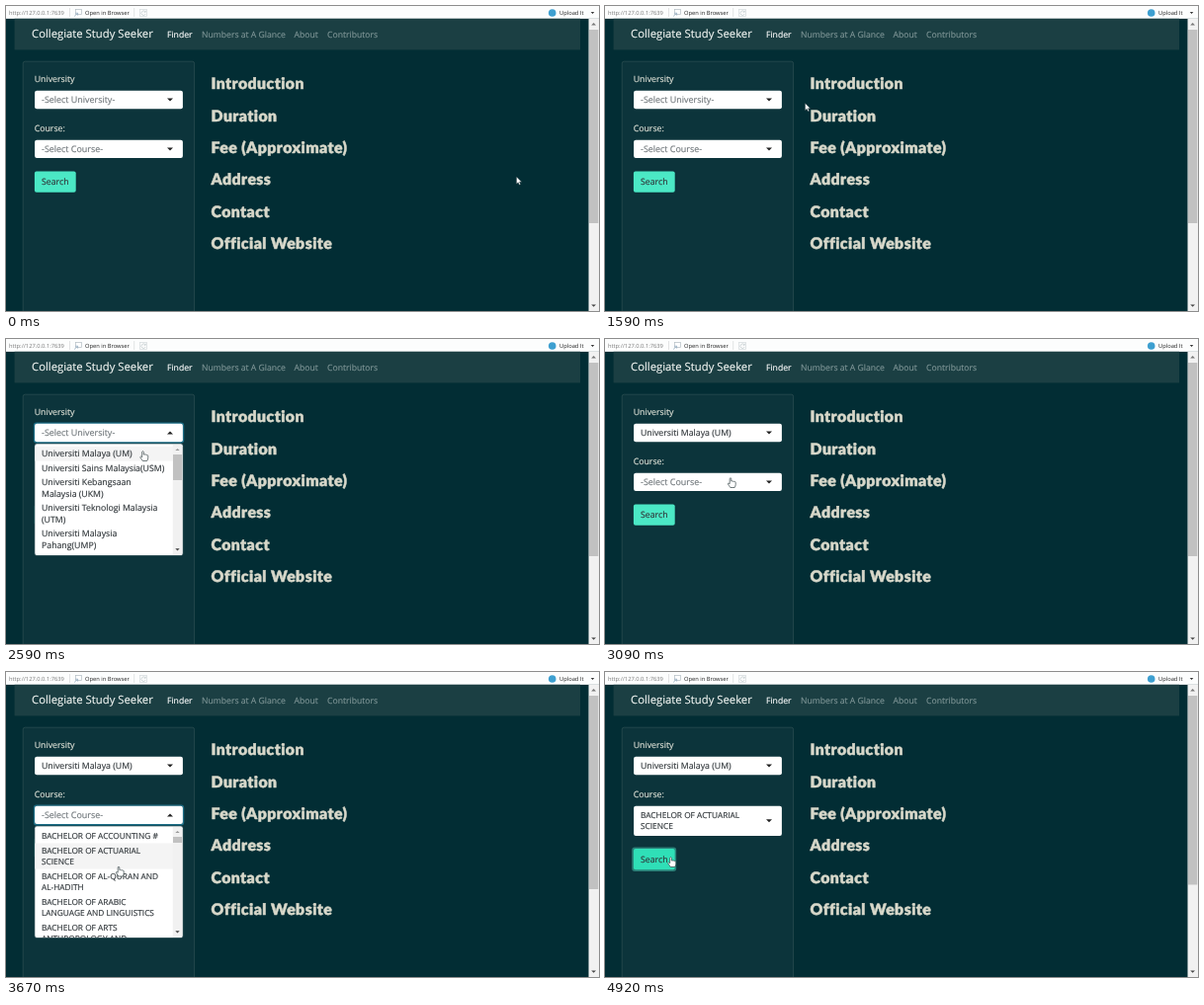
Write an HTML page that moves like this. It is 600 by 309 pixels and loops after 5 s.

```html
<!DOCTYPE html>
<html lang="en">
<head>
<meta charset="utf-8">
<title>Course search</title>
<style>
  html, body { margin: 0; width: 100%; height: 100%; overflow: hidden; background: #022d34; }
  svg { display: block; width: 600px; height: 309px; }
  text {
    font-family: "Open Sans", "Noto Sans", sans-serif; font-size: 8.75px; white-space: pre;
    text-rendering: geometricPrecision; fill: currentColor; stroke: currentColor; stroke-width: .15;
  }
  .head { font: 900 15.8px Lato, sans-serif; letter-spacing: .45px; color: #d8d8ca; stroke-width: .5; stroke-linejoin: round; }
  .brand { font-size: 11.3px; color: #f1f5f2; }
  .nav { font-size: 8.62px; color: #7d9495; }
  .on { color: #fff; }
  .label { color: #e3e5da; }
  .hint { font-size: 8.95px; color: #70777b; }
  .item { color: #30363a; }
  .caps { font-size: 8.3px; }
  .tool { font-size: 5.75px; color: #222; stroke: none; }
  .url { color: #777; }
</style>
</head>
<body>
<svg viewBox="0 0 600 309">
  <g id="page"></g>
  <g id="form"></g>
  <g id="cursor"></g>
</svg>
<script>
const LOOP = 5000;
const OPEN_UNI = 2090, PICK_UNI = 2750, OPEN_COURSE = 3340, PICK_COURSE = 4170, PRESS = 4750;

// Cursor path: time, x, y of the tip
const PATH = [
  [0, 516.5, 173], [250, 516.5, 173], [1590, 202.5, 98.5], [1920, 150, 96], [2090, 150, 96],
  [2590, 138.5, 113.5], [2750, 138.5, 113.5], [3090, 127, 140.5], [3340, 124, 144],
  [3670, 114, 197], [4090, 113, 193], [4250, 113, 193], [4750, 66.5, 187.5], [5000, 66.5, 187.5]
];

const UNIS = [
  ["Universiti Malaya (UM)"],
  ["Universiti Sains Malaysia(USM)"],
  ["Universiti Kebangsaan", "Malaysia (UKM)"],
  ["Universiti Teknologi Malaysia", "(UTM)"],
  ["Universiti Malaysia", "Pahang(UMP)"]
];
const COURSES = [
  ["BACHELOR OF ACCOUNTING #"],
  ["BACHELOR OF ACTUARIAL", "SCIENCE"],
  ["BACHELOR OF AL-QURAN AND", "AL-HADITH"],
  ["BACHELOR OF ARABIC", "LANGUAGE AND LINGUISTICS"],
  ["BACHELOR OF ARTS", "ANTHROPOLOGY AND"]
];

const layer = id => document.getElementById(id);
const text = (x, y, str, cls) => `<text x="${x}" y="${y}" class="${cls}">${str}</text>`;
const rect = (x, y, w, h, fill, more = "") =>
  `<rect x="${x}" y="${y}" width="${w}" height="${h}" fill="${fill}" ${more}/>`;
const path = (d, fill, more = "") => `<path d="${d}" fill="${fill}" ${more}/>`;

// Triangle centred on x, y; dir 1 points down, -1 up
const caret = (x, y, w, dir, fill = "#333") =>
  path(`M${x - w} ${y - dir * w / 2}h${2 * w}l${-w} ${dir * w}z`, fill);

function drawPage() {
  const heads = ["Introduction", "Duration", "Fee (Approximate)", "Address", "Contact", "Official Website"];
  const line = 'stroke-width=".7" stroke=';
  return rect(0, 0, 600, 309, "#022d34")
    // toolbar
    + rect(0, 0, 600, 12.8, "#fcfdfd") + rect(0, 12.2, 600, .6, "#e6e9ea")
    + text(3, 9.2, "http://127.0.0.1:7639", "tool url")
    + [64, 129.5].map(x => rect(x, 2, .6, 9, "#d0d3d4")).join("")
    + rect(70.5, 3.6, 6, 5, "#fff", line + '"#b3bdc3"')
    + path("M69 10.6l3.6-3.4m-2.4 0h2.4v2.4", "none", line + '"#8fa9bd"')
    + text(80, 9.2, "Open in Browser", "tool")
    + rect(135.5, 3.5, 7, 7, "#fafbfb", line + '"#d5dbdd"')
    + path("M141 6a2.2 2.2 0 1 0 .2 2M141.3 4.6v1.6h-1.6", "none", line + '"#c0cacd"')
    + '<circle cx="552.7" cy="7" r="3.8" fill="#3d9fd0"/>'
    + text(560, 9.2, "Upload It", "tool") + caret(593.5, 7, 1.8, 1)
    // navigation
    + rect(8.6, 12.8, 572.4, 31.6, "#1b3f43")
    + text(26, 32.3, "Collegiate Study Seeker", "brand")
    + text(163, 31.8, "Finder", "nav on")
    + text(198, 31.8, "Numbers at A Glance", "nav")
    + text(291.5, 31.8, "About", "nav") + text(325, 31.8, "Contributors", "nav")
    // panel and headings
    + rect(17.2, 56.2, 173.4, 270, "#0c343b", 'rx="2" stroke="#274a4e" stroke-width=".9"')
    + heads.map((h, i) => text(207.5, 84.1 + i * 32.4, h, "head")).join("")
    // scrollbar
    + rect(589.5, 13, 10.5, 296, "#f1f1f1")
    + caret(594.6, 18.3, 2.4, -1, "#777") + caret(594.6, 303.6, 2.4, 1, "#444");
}

function drawSelect(y, lines, cls, open) {
  const h = lines.length > 1 ? 30.2 : 18.4;
  const glow = open ? rect(28.5, y - .6, 151, h + 1.2, "none", 'rx="2.5" stroke="#1c6d85" stroke-width="1.4"') : "";
  return glow + rect(29.1, y, 149.8, h, "#fff", 'rx="2"')
    + lines.map((s, i) => text(36, y + 12.3 + i * 11.4, s, cls)).join("")
    + caret(166, y + h / 2, 3, open ? -1 : 1, "#222");
}

const rowHeight = row => row.length > 1 ? 26 : 14.5;

function drawMenu(y, rows, cls, hoverY, thumb) {
  let top = y + 3, hover = "", words = "";
  const inside = hoverY >= top;
  rows.forEach((row, i) => {
    const h = rowHeight(row);
    if (inside ? hoverY >= top && hoverY < top + h : i === 0)
      hover = rect(29.2, top, 140, h, "#f4f4f4");
    row.forEach((s, n) => words += text(36, top + 10.3 + n * 11.4, s, cls));
    top += h;
  });
  const box = fill => rect(29.2, y + .3, 149.6, 112.8, fill, 'rx="2"');
  return `<clipPath id="menu">${box("#fff")}</clipPath>`
    + rect(28.8, y, 150.4, 113.5, "#5d767a", 'rx="2"')
    + `<g clip-path="url(#menu)">` + box("#fff") + hover + words
    + rect(168.8, y + 1, 9.4, 112, "#f1f1f1") + rect(169, y + 11, 9, thumb, "#c1c1c1")
    + caret(173.5, y + 6, 2.2, -1, "#999") + caret(173.5, y + 107.4, 2.2, 1, "#444") + "</g>";
}

function drawForm(t, hoverY) {
  const uniOpen = t >= OPEN_UNI && t < PICK_UNI;
  const courseOpen = t >= OPEN_COURSE && t < PICK_COURSE;
  const picked = t >= PICK_COURSE, pressed = t >= PRESS;
  const by = picked ? 179 : 167.5;
  // a longer page makes the scroll thumb shorter
  let out = rect(590, 24, 9.3, picked ? 191.5 : 196, "#c1c1c1")
    + text(28.7, 77.2, "University", "label") + text(28.7, 127.2, "Course:", "label")
    + (t < PICK_UNI ? drawSelect(85.8, ["-Select University-"], "hint", uniOpen)
                    : drawSelect(85.8, UNIS[0], "item", false))
    + (picked ? drawSelect(135.7, COURSES[1], "item caps", false)
              : drawSelect(135.7, ["-Select Course-"], "hint", courseOpen));
  if (pressed) out += rect(27.2, by - 1.5, 45, 24.4, "#2a7f77", 'rx="3"');
  out += rect(28.9, by + .1, 41.8, 21.2, pressed ? "#2fdfb7" : "#4be8c5", 'rx="2"')
    + text(36, by + 13.9, "Search", "item");
  if (uniOpen) out += drawMenu(106, UNIS, "item", hoverY, 26);
  if (courseOpen) out += drawMenu(156, COURSES, "item caps", hoverY, 6);
  return out;
}

// Monotone cubic through the path points, one axis at a time
function along(t, axis) {
  const slope = i => PATH[i + 1] && PATH[i]
    ? (PATH[i + 1][axis] - PATH[i][axis]) / (PATH[i + 1][0] - PATH[i][0]) : 0;
  const tangent = i => {
    const a = slope(i - 1), b = slope(i);
    return a * b > 0 ? 2 * a * b / (a + b) : 0;
  };
  let i = 0;
  while (i < PATH.length - 2 && t >= PATH[i + 1][0]) i++;
  const d = PATH[i + 1][0] - PATH[i][0], u = (t - PATH[i][0]) / d, v = 1 - u;
  return (1 + 2 * u) * v * v * PATH[i][axis] + u * v * v * d * tangent(i)
    + u * u * (3 - 2 * u) * PATH[i + 1][axis] - u * u * v * d * tangent(i + 1);
}

function overControl(t, x, y) {
  const within = (a, b) => y >= a && y <= b;
  if (x < 28.7 || x > 179) return false;
  if (within(85.5, 104.5)) return true;
  if (t >= OPEN_UNI && t < PICK_UNI) return within(106, 219);
  if (t >= OPEN_COURSE && t < PICK_COURSE) return within(135, 270);
  if (t >= PICK_COURSE) return within(135, 166) || x < 71 && within(179, 200);
  return within(135, 154.5) || x < 71 && within(167.5, 189);
}

function drawCursor(t, x, y) {
  const arrow = "M0 0V7.2L1.7 5.7 2.9 8.2 4.1 7.7 3 5.2H5.2Z";
  const hand = "M-.8 .8Q0 -.6 .8 .8V3.6Q1.7 2.9 2.4 3.8 3.3 3.2 3.9 4.1 5 3.7 5.2 4.9V7Q5 8.6 4.2 10H-.2Q-1.5 8-2.8 6.2-2.4 4.8-.8 6.2Z";
  const over = overControl(t, x, y);
  return `<g transform="translate(${x} ${y})">`
    + path(over ? hand : arrow, "#fff", `stroke="#27363a" stroke-width="${over ? .65 : .4}" stroke-linejoin="round"`)
    + "</g>";
}

// The picture advances twelve times a second, on 10 ms marks
const stepStart = k => Math.ceil(k * 25 / 3) * 10;

const begin = performance.now();
let shown = -1;

function frame() {
  const t = (performance.now() - begin) % LOOP;
  let k = Math.floor(t * 12 / 1000);
  if (stepStart(k) > t) k--;
  if (k !== shown) {
    shown = k;
    const at = stepStart(k), x = along(at, 1), y = along(at, 2);
    layer("form").innerHTML = drawForm(at, y);
    layer("cursor").innerHTML = drawCursor(at, x, y);
  }
  requestAnimationFrame(frame);
}

layer("page").innerHTML = drawPage();
frame();
</script>
</body>
</html>
```
